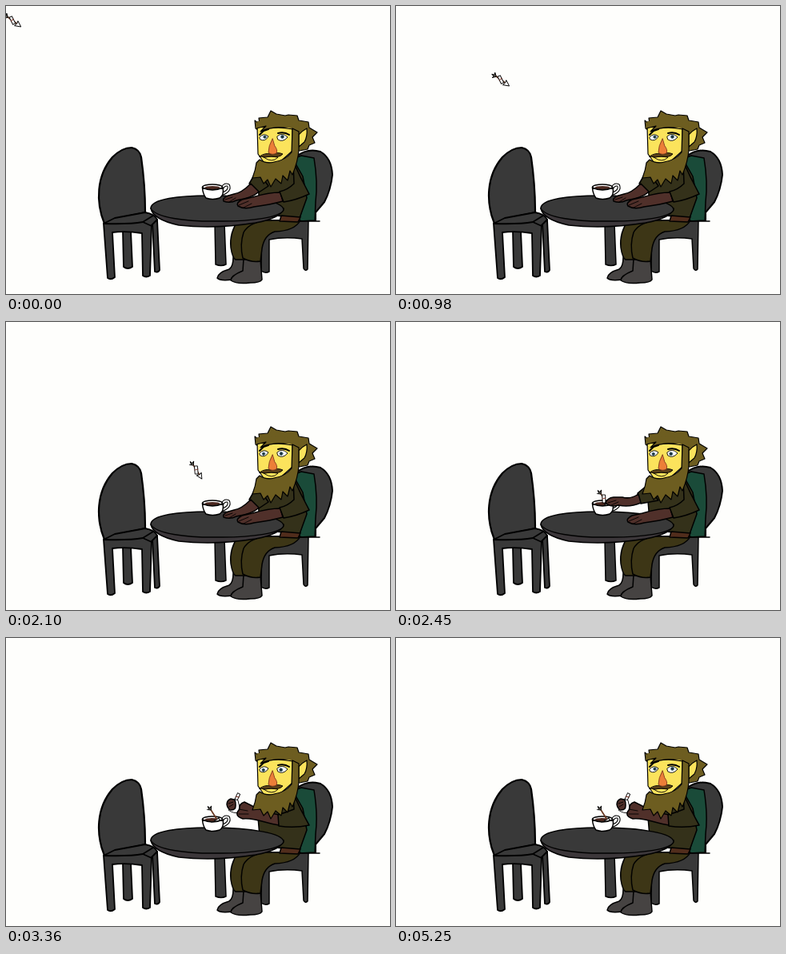
An HTML page for the animation above (5320 ms loop, 480x360 px).

```html
<!DOCTYPE html>
<html lang="en">
<head>
<meta charset="utf-8">
<title>Message by arrow</title>
<style>
html, body { margin: 0; width: 100%; height: 100%; overflow: hidden; background: #fefefc; }
svg { display: block; width: 480px; height: 360px; }
.grey { fill: #393939; }
.hair { fill: #6d5d20; }
.tunic { fill: #34311a; }
.pants { fill: #3d3616; }
.glove { fill: #50302a; }
.boot { fill: #464342; }
.white { fill: #fff; }
.skin { fill: #fbe35c; }
.line { fill: none; }
.thin { stroke-width: .9; }
</style>
</head>
<body>
<svg viewBox="0 0 480 360" stroke="#000" stroke-width="1.5" stroke-linejoin="round" stroke-linecap="round">
  <!-- empty chair -->
  <g class="grey" stroke-width="1.8">
    <path d="M146 281L147 326Q152 330 158 326L156 281Z"/>
    <path d="M183 271L186 332Q190 334 192 330L189 267Z"/>
    <path d="M123 272C112 245 113 212 133 189Q145 177 157 177Q167 179 169 189C172 210 174 235 174 258L150 263Z" stroke-width="2.200"/>
    <path d="M122 272L136 265L174 258Q186 260 189 267L182 274L180 337Q175 340 171 337L170 284Q150 281 133 283L136 339Q131 343 127 340Z"/>
    <path class="line" d="M122 272Q155 273 171 270L182 275M171 270L184 262"/>
  </g>

  <!-- occupied chair, cloak and body -->
  <path class="grey" stroke-width="2" d="M363 188Q377 177 393 182Q407 190 408 211Q406 230 398 245L387 258V268H372Z"/>
  <path class="grey" d="M320 268H378L377 329Q374 332 372 328L370 291Q348 288 329 292L329 332Q324 335 319 331Z"/>
  <path fill="#1a4b39" d="M359 191L369 187L385 190Q390 220 387 245L386 268L366 269L374 240Z"/>
  <path class="line" d="M366 269H392"/>
  <path class="boot" d="M284 314Q284 326 279 329Q265 333 264 340Q267 344 283 342L299 333V314Z"/>
  <path class="boot" d="M297 316L296 331Q281 337 281 343Q288 348 305 346Q318 346 320 342L318 317Z"/>
  <path class="pants" d="M291 267Q279 283 281 302Q283 315 287 317H300L326 272Z"/>
  <path class="pants" d="M368 268Q361 281 336 282Q323 286 320 303L318 319Q307 321 296 315Q292 298 297 283Q303 272 322 268Z"/>
  <path class="tunic" d="M314 212L358 190L371 213L376 240L367 265L318 260Z"/>
  <path fill="#512d1c" d="M344 262L368 264L365 270L342 269Z"/>

  <!-- table -->
  <path class="grey" d="M261 272L262 323Q269 326 275 323L273 272Z"/>
  <path fill="#3c373a" d="M181 253Q184 267 216 274Q262 279 312 271Q344 265 347 253Z"/>
  <path class="grey" d="M181 253C181 241 217 237 254 237C306 237 347 244 347 255C343 264 309 269 270 269C222 270 187 264 181 253Z"/>

  <!-- cup, with the arrow between rim and front -->
  <path class="line" stroke-width="4" d="M270 228Q273 222 278 224Q281 231 270 235"/>
  <path class="line" stroke="#fff" stroke-width="1.800" d="M270 228Q273 222 278 224Q281 231 270 235"/>
  <ellipse class="white" cx="258" cy="226.500" rx="12.500" ry="3.500"/>
  <ellipse fill="#4b2820" cx="258" cy="227" rx="9.500" ry="2" stroke="none"/>
  <g id="arrow" class="thin">
    <path class="line" stroke="#6b3b24" stroke-width="1.800" d="M-9 0H8"/>
    <path fill="#5d5a52" d="M-7 0L-11 -3L-10 0L-13 1L-9 2L-10 4Z"/>
    <path class="white" d="M13 0L6 -3.500L7 0L6 3.500Z"/>
  </g>
  <path class="white" d="M245.500 227Q258 233 271 227Q273 236 267 240Q258 243 250 240Q246 235 245.500 227Z"/>
  <g id="scroll" class="white thin">
    <path d="M-2 -5L1.500 -5L2 5L-1.500 5Z"/>
    <path class="line" stroke="#7a3022" d="M-2 0L2 -1"/>
  </g>

  <!-- arms -->
  <path id="sheet" class="white thin" d="M286 202Q284 212 278 215Q285 220 291 218Q293 210 290 203Z"/>
  <path id="farSleeve" class="tunic"/>
  <path id="farGlove" class="glove"/>
  <path id="farFingers" class="line thin"/>
  <path id="nearGlove" class="glove"/>
  <path id="nearFingers" class="line thin"/>
  <path id="nearSleeve" class="tunic"/>

  <!-- head -->
  <g stroke-width="1.200">
  <path class="hair" d="M312 153L311 143L317 148L316 140L327 139L331 131L338 135L349 137L353 136L364 137L366 143L378 145L379 152L389 158L383 164L386 171L379 174L377 179L367 181L340 172Z"/>
  <path class="skin" d="M314 151L324 152L358 151L358 181L340 197L322 195L315 185Z"/>
  <path class="hair" d="M312 153L314 144L340 143L366 146L365 157Q358 152 346 151Q331 150 319 158L324 151Z" stroke="none"/>
  <path class="line" d="M313 153L325 150L318 157Q333 149 358 154L365 157"/>
  <path class="skin" d="M366 161Q370 156 376 153Q377 163 373 170L366 176Z"/>
  <path class="hair" d="M358 153L366 157L366 180Q365 194 358 211L355 206L352 218L346 212L344 222L337 216L331 226L327 217L322 222L318 214L308 215Q312 205 313 196L317 192Q326 198 335 195Q349 193 357 183Z"/>
  <path class="skin thin" d="M322 189Q331 187 340 189Q333 197 322 189Z"/>
  <path fill="#5b4119" class="thin" d="M317 188Q324 183 331 185Q340 182 346 185Q342 190 332 188Q324 190 317 188Z"/>
  <path fill="#ec7e38" stroke="#7d3a1f" class="thin" d="M333 166Q328 175 328 183Q332 187 338 184Q340 180 336 175Z"/>
  <path class="line" stroke-width="2" d="M317 161L322 156L328 154M340 159Q348 157 354 161"/>
  <path class="white thin" d="M317 164Q322 158 328 163Q324 170 318 167Z"/>
  <path class="white thin" d="M339 163Q345 157 352 164Q346 171 340 167Z"/>
  </g>
  <g id="pupils" fill="#172a36" stroke="#49717e" stroke-width=".8">
    <circle cx="323.500" cy="163.700" r="1.800"/><circle cx="345.500" cy="163.500" r="2"/>
  </g>
  <path id="tear" fill="#d9f2fc" stroke="#7ba9b5" stroke-width=".6" d="M0 -4Q3 1 1.500 3Q0 4 -1.500 3Q-3 1 0 -4Z"/>
</svg>
<script>
const STEP = 70, LOOP = 5320;
const $ = id => document.getElementById(id);
const lerp = (a, b, p) => a + (b - a) * p;
const ramp = (s, a, b) => Math.min(1, Math.max(0, (s - a) / (b - a)));

// Interpolates rows of [step, ...values].
function track(s, rows) {
  const i = rows.findIndex(r => r[0] > s);
  if (i < 0) return rows[rows.length - 1].slice(1);
  const a = rows[Math.max(0, i - 1)], b = rows[i];
  return a.slice(1).map((v, k) => lerp(v, b[k + 1], ramp(s, a[0], b[0])));
}

// Blends two paths that share the same commands.
function blend(a, b, p) {
  const ends = b.match(/[\d.]+/g);
  let i = 0;
  return a.replace(/[\d.]+/g, n => lerp(+n, +ends[i++], p).toFixed(2));
}

// Resting, reaching for the cup, holding the letter
const far = {
  farSleeve: [
    'M314 205L304 222L316 233L328 225Z',
    'M314 204L302 214L306 227L328 223Z',
    'M320 208L314 213L317 224L328 223Z'],
  farGlove: [
    'M306 222C300 228 293 234 285 235L278 237Q270 240 272 244Q280 247 288 243C298 241 309 239 316 232Z',
    'M303 215C296 220 290 221 283 219L272 219Q264 220 262 226Q268 232 278 229C288 231 297 230 306 226Z',
    'M287 208C287 205 287 203 285 202L281 201Q276 203 276 208Q277 214 281 215C285 215 287 213 287 210Z'],
  farFingers: [
    'M274 242L283 239M279 245L287 240',
    'M265 226L275 223M269 229L278 225',
    'M278 207L284 205M279 211L284 208']
};
// Resting, holding the letter
const near = {
  nearGlove: [
    'M343 233C330 233 318 236 308 239L295 242Q287 246 290 250Q298 255 310 251C325 249 335 247 346 244Z',
    'M341 221C328 219 318 214 308 210L298 205Q291 207 292 214Q284 222 296 226C310 224 325 232 341 234Z'],
  nearFingers: [
    'M291 249L303 244M297 252L307 247',
    'M291 214L302 216M291 220L303 220'],
  nearSleeve: [
    'M359 194Q368 215 379 235Q362 243 347 245L342 232Q352 230 360 222Z',
    'M359 194Q368 215 379 234Q360 238 341 235L340 221Q350 218 360 214Z']
};
const flight = [
  [0, 8, 18, 36], [7, 71, 57, 36], [16, 148, 102, 36], [20, 182, 122, 36],
  [24, 207, 138, 42], [30, 238, 185, 58], [32, 252, 212, 60], [33, 260, 221, 58]
];

const place = (id, x, y, turn = 0) =>
  $(id).setAttribute('transform', `translate(${x} ${y}) rotate(${turn})`);
const show = (id, on) => $(id).style.display = on ? '' : 'none';

function draw(s) {
  const reach = ramp(s, 32, 35), lift = ramp(s, 38, 47);
  for (const id in far) {
    const [rest, cup, up] = far[id];
    $(id).setAttribute('d', lift ? blend(cup, up, lift) : blend(rest, cup, reach));
  }
  for (const id in near) $(id).setAttribute('d', blend(...near[id], lift));

  const [x, y, turn] = track(s, flight);
  place('arrow', x, y, turn);
  if (s < 33) place('scroll', x, y, turn - 60);
  else place('scroll', lerp(260, 289, lift), lerp(221, 199, lift), lerp(0, 28, lift));
  show('sheet', s >= 47);

  const gaze = ramp(s, 17, 33) - ramp(s, 59, 66);
  place('pupils', -1.8 * gaze, 1.3 * gaze);
  show('tear', s >= 67 && s < 75);
  place('tear', 347.5, lerp(171, 185, ramp(s, 69, 74)));
}

function tick(now) {
  draw(Math.floor(now % LOOP / STEP));
  requestAnimationFrame(tick);
}
tick(performance.now());
</script>
</body>
</html>
```
